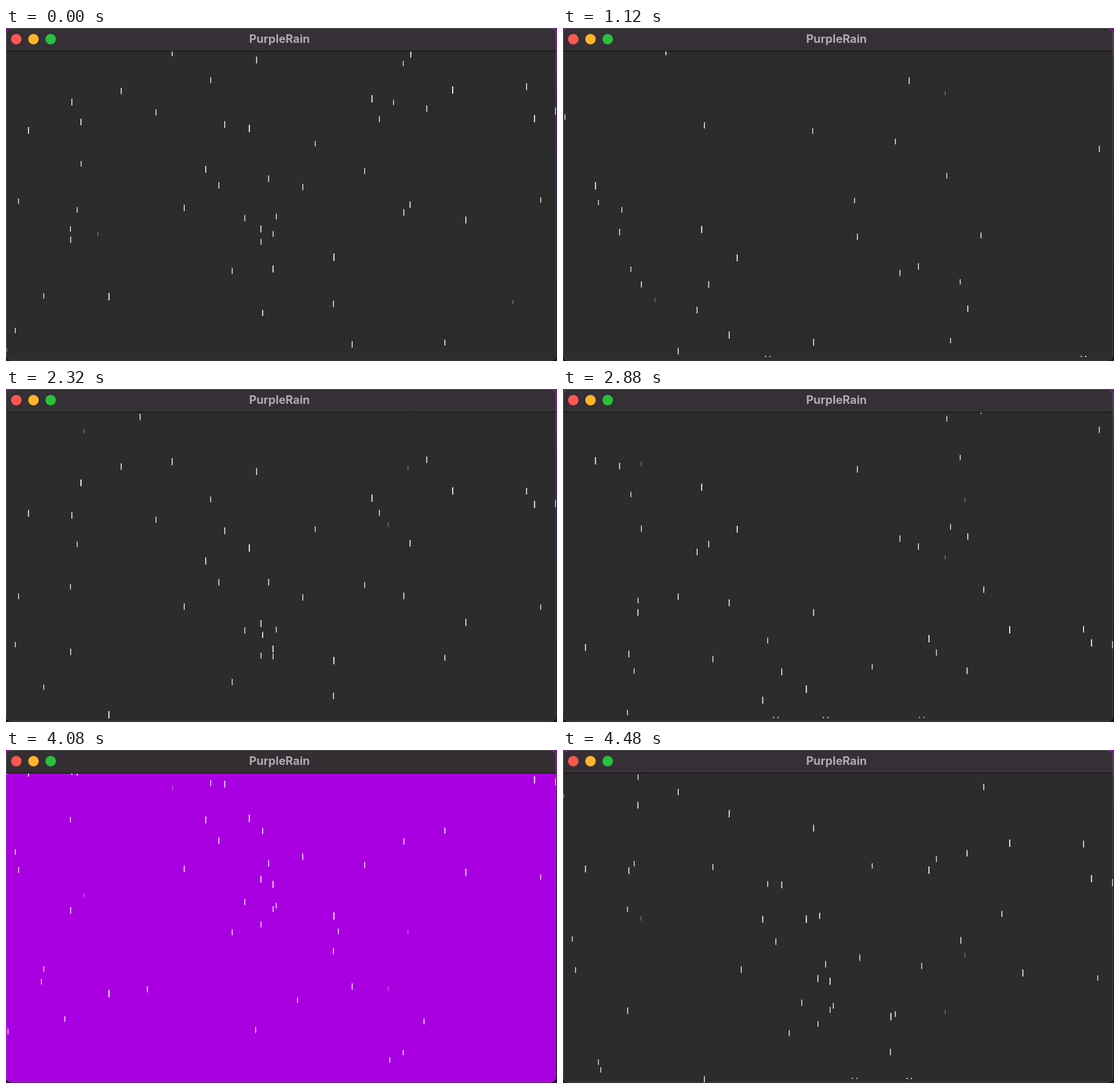
Recreate the animation shown at these times as an HTML page. Size 962 by 582 pixels, loop 4.56 s.

```html
<!DOCTYPE html>
<html lang="en">
<head>
<meta charset="utf-8">
<title>PurpleRain</title>
<style>
  html, body { margin: 0; width: 100%; height: 100%; overflow: hidden; background: #1c1020; }
  svg { display: block; width: 962px; height: 582px; }
</style>
</head>
<body>
<svg viewBox="0 0 962 582">
  <defs>
    <linearGradient id="desk" x2="0" y2="1">
      <stop offset="0" stop-color="#6d1d80"/>
      <stop offset=".2" stop-color="#3c1448"/>
      <stop offset="1" stop-color="#22102a"/>
    </linearGradient>
    <clipPath id="window"><rect width="960" height="581" rx="10"/></clipPath>
    <clipPath id="view"><rect y="41" width="960" height="540"/></clipPath>
  </defs>
  <rect width="962" height="582" fill="url(#desk)"/>
  <g clip-path="url(#window)">
    <rect id="sky" y="41" width="960" height="541"/>
    <rect id="bar" width="960" height="40"/>
    <rect y="40" width="960" height="1" fill="#0c0c0c"/>
    <g id="rain" clip-path="url(#view)" fill="none" stroke="#fafafa"></g>
  </g>
  <rect x=".5" y=".5" width="959.5" height="580.5" rx="9.5" fill="none" stroke="#fff" stroke-opacity=".2"/>
  <g id="lights"></g>
  <text x="477.5" y="25.5" text-anchor="middle" font-family="Inter, Roboto, sans-serif"
        font-weight="700" font-size="20" fill="#aeaab0">PurpleRain</text>
</svg>
<script>
const LOOP = 4560, STEP = 80, STRIKE = 4080;
const FALL = .434;              // px per ms at full speed
const FLOOR = 578, SPLASH = 15; // where a drop bursts, and for how many px of fall
const NEAR = 72, FAR = 7;

const byId = id => document.getElementById(id);

function add(parent, tag, attributes) {
  const node = document.createElementNS('http://www.w3.org/2000/svg', tag);
  for (const name in attributes) node.setAttribute(name, attributes[name]);
  return parent.appendChild(node);
}

let seed = 7;
function random(low = 0, high = 1) {
  seed = (seed + 0x6d2b79f5) | 0;
  let n = Math.imul(seed ^ (seed >>> 15), seed | 1);
  n ^= n + Math.imul(n ^ (n >>> 7), n | 61);
  return low + (high - low) * ((n ^ (n >>> 14)) >>> 0) / 2 ** 32;
}

// Most near drops fall at almost full speed; far ones are slow, thin and dim.
function makeDrop(index) {
  const far = index >= NEAR;
  const slowness = random() ** 5;
  const size = random();
  return {
    x: +(960 * random() ** 1.2).toFixed(1),
    y: random(-360, 585),
    speed: far ? .236 : 1.015 - .26 * slowness,
    length: far ? 7.5 : 9.3 + 3.7 * size * (1 - slowness),
    reach: far ? 1 : 2.2,
    returns: [random(910, 970), random(910, 970)],
    path: add(byId('rain'), 'path', {
      'stroke-width': far ? 1.1 : 1.35 + .5 * size ** 3,
      'stroke-opacity': far ? .5 : 1
    })
  };
}

['#ff5650', '#feb429', '#27c13d'].forEach((fill, i) =>
  add(byId('lights'), 'circle', { cx: 18 + 30 * i, cy: 19.5, r: 9.2, fill }));

const drops = Array.from({ length: NEAR + FAR }, (_, i) => makeDrop(i));

function shape({ x, y, speed, length, reach, returns }, time) {
  const end = FLOOR + SPLASH * speed;
  y += speed * FALL * time;
  for (const height of returns) if (y > end) y -= height;
  if (y < FLOOR) return `M${x},${y - length / 2}v${length}`;
  if (y < end) return `M${x - 5},573.3l${reach},1.5M${x + 5},573.3l${-reach},1.5`;
  return '';
}

function draw(time) {
  const flash = time === STRIKE;
  byId('sky').setAttribute('fill', flash ? '#a800e0' : '#2c2c2c');
  byId('bar').setAttribute('fill', flash ? '#332f33' : '#352f36');
  for (const drop of drops) drop.path.setAttribute('d', shape(drop, time));
}

function tick() {
  draw(Math.floor(performance.now() % LOOP / STEP) * STEP);
  requestAnimationFrame(tick);
}
tick();
</script>
</body>
</html>
```
